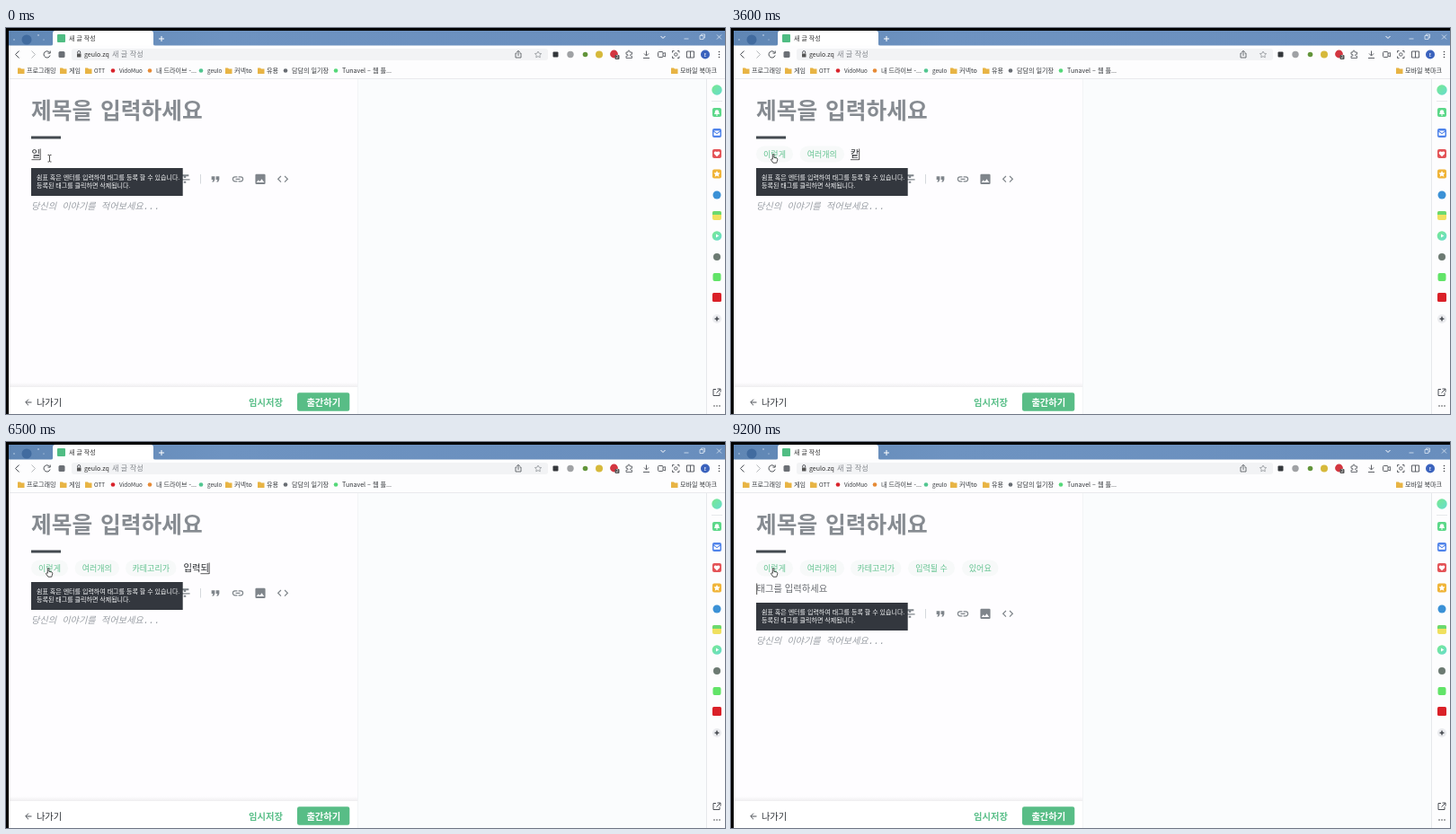
These frames come from a looping animation (800x430 px, 9300 ms). An HTML page:

```html
<!DOCTYPE html>
<html lang="ko">
<head>
<meta charset="utf-8">
<style>
html, body { margin: 0; width: 100%; height: 100%; overflow: hidden; background: #000; }
svg { display: block; width: 800px; height: 430px; }
text { font-family: "Noto Sans CJK KR", "Noto Sans CJK JP", sans-serif; white-space: pre; }
.mono { font-family: "Liberation Mono", "Noto Sans CJK KR", monospace; font-style: italic; }
.line { fill: none; stroke: #4b4f55; stroke-width: 1; }
.b { font-weight: 700; }
</style>
</head>
<body>
<svg viewBox="0 0 800 430">
  <defs>
    <linearGradient id="strip"><stop stop-color="#5f86b4"/><stop offset=".3" stop-color="#6e93c1"/><stop offset="1" stop-color="#698ebd"/></linearGradient>
    <linearGradient id="shade" x2="0" y2="1"><stop stop-color="#000" stop-opacity="0"/><stop offset="1" stop-color="#000" stop-opacity=".06"/></linearGradient>
    <linearGradient id="mint" x2="1" y2="1"><stop stop-color="#79e98f"/><stop offset="1" stop-color="#66dcd0"/></linearGradient>
  </defs>

  <!-- tab strip -->
  <rect x="3" y="3" width="797" height="17" fill="url(#strip)"/>
  <circle cx="23" cy="13" r="5.500" fill="#416b9f"/>
  <g fill="#d5e2f2"><circle cx="9" cy="13" r=".7"/><circle cx="36" cy="8" r=".8"/><circle cx="42" cy="13" r=".6"/></g>
  <path d="M50 20q2 0 2-2V6q0-3 3-3h106q3 0 3 3v12q0 2 2 2z" fill="#fff"/>
  <rect x="57" y="7" width="9" height="9" rx="1" fill="#50bd83"/>
  <text x="70" y="13.600" font-size="7" fill="#333">새 글 작성</text>
  <path d="M170 12h6M173 9v6M728.500 9l2.500 2.500 2.500-2.500" fill="none" stroke="#fff"/>
  <path d="M754.500 12h5M772 8.500h4v4h-4zM773.500 8.500v-1.500h4v4h-1.500M791 7.500l5 5M796 7.500l-5 5" fill="none" stroke="#dbe6f3" stroke-width=".8"/>

  <!-- address row and bookmarks -->
  <rect x="3" y="19.500" width="797" height="37.500" fill="#fdfdfe"/>
  <rect x="73" y="23" width="530" height="13" rx="3" fill="#f2f3f5"/>
  <g class="line">
    <path d="M14.500 25.500l-4 4 4 4"/>
    <path d="M28.500 25.500l4 4-4 4" stroke="#b5b8bc"/>
    <path d="M48.700 27.500a3.600 3.600 0 1 0 .4 3M49.200 25.500v2.600h-2.700"/>
    <path d="M79.700 28.500v-1.500a1.500 1.500 0 0 1 3 0v1.500" stroke-width=".9"/>
    <path d="M568.500 28h-1.500v5h6v-5h-1.500M570 31v-5.500M568.300 27l1.700-1.700 1.700 1.700" stroke-width=".8"/>
    <path d="M592 26l1.200 2.200 2.500.4-1.800 1.700.4 2.500-2.300-1.200-2.200 1.200.4-2.500-1.800-1.700 2.500-.4z" stroke="#92969b" stroke-width=".8"/>
    <path d="M690 27h2v-1a1 1 0 0 1 2 0v1h2.500v2.300h-1a1 1 0 0 0 0 2h1v2.200h-6.500v-2.200h1a1 1 0 0 0 0-2h-1z" stroke-width=".8"/>
    <path d="M712.500 25.500v5M710 28.500l2.500 2.500 2.500-2.500M709 33.500h7" stroke-width=".9"/>
    <rect x="725.500" y="26.500" width="5.500" height="6" rx="1" stroke-width=".9"/>
    <path d="M731 28.500l2.500-1v4.500l-2.500-1" stroke-width=".8"/>
    <path d="M741.500 27.500v-2h2M747 25.500h2v2M749 31.500v2h-2M743.500 33.500h-2v-2" stroke-width=".9"/>
    <circle cx="745.300" cy="29.500" r="1.700" stroke-width=".9"/>
    <path d="M757.500 26h8v7h-8zM761.500 26v7" stroke-width=".9"/>
  </g>
  <rect x="79" y="28.500" width="4.500" height="4" rx=".5" fill="#555"/>
  <rect x="58.500" y="26" width="7" height="7" rx="1.500" fill="#6b6f75"/>
  <text x="87" y="32.200" font-size="7" fill="#333">geulo.zq</text>
  <text x="118" y="32.400" font-size="8.200" fill="#888c91">새 글 작성</text>
  <rect x="608.500" y="26.500" width="6" height="6" rx="1" fill="#34373b"/>
  <circle cx="628" cy="29.500" r="3.700" fill="#a0a2a5"/>
  <circle cx="644.500" cy="29.500" r="2.800" fill="#63953b"/>
  <circle cx="660" cy="29.500" r="4" fill="#d6b93b"/>
  <circle cx="676.500" cy="29" r="4.400" fill="#d33640"/>
  <rect x="677.500" y="30" width="5" height="5" rx="1" fill="#555"/>
  <text x="678.700" y="34.300" font-size="4.500" fill="#fff">2</text>
  <circle cx="778" cy="29.500" r="5" fill="#3a62bd"/>
  <text x="778" y="31.500" font-size="5" fill="#fff" text-anchor="middle">E</text>
  <g fill="#44474b"><circle cx="793.500" cy="26.500" r=".8"/><circle cx="793.500" cy="29.500" r=".8"/><circle cx="793.500" cy="32.500" r=".8"/></g>
  <g id="marks"></g>
  <path d="M3 56.500h797" stroke="#e9eaed"/>

  <!-- page panes -->
  <rect x="3" y="57" width="388" height="373" fill="#fefdff"/>
  <rect x="391" y="57" width="388" height="373" fill="#fafcfd"/>
  <path d="M391.500 57v373" stroke="#f2f4f6"/>
  <text x="28" y="100.500" font-size="24.700" class="b" word-spacing="2" fill="#868b91">제목을 입력하세요</text>
  <rect x="28" y="120.500" width="33" height="3" fill="#43494f"/>

  <g id="tags"></g>
  <g id="field">
    <text id="typed" font-size="10.300"></text>
    <path id="under" stroke="#333" stroke-width=".8"/>
    <path id="caret" stroke="#222" stroke-width=".8"/>
  </g>

  <g id="below">
    <path d="M216.500 163v10.500" stroke="#d5d8dc"/>
    <g id="tools" fill="#7f858b"></g>
    <text class="mono" x="28" y="201.700" font-size="10.200" fill="#9a9fa5">당신의 이야기를 적어보세요...</text>
    <rect x="28" y="156" width="168.700" height="31" fill="#33373e"/>
    <g font-size="7" fill="#f7f8f9">
      <text x="34" y="169">쉼표 혹은 엔터를 입력하여 태그를 등록 할 수 있습니다.</text>
      <text x="34" y="178.200">등록된 태그를 클릭하면 삭제됩니다.</text>
    </g>
  </g>

  <!-- footer -->
  <rect x="3" y="395" width="388" height="5" fill="url(#shade)"/>
  <rect x="3" y="400" width="388" height="30" fill="#fff"/>
  <path class="line" d="M28.500 417h-6.500M25 413.700l-3.300 3.300 3.300 3.300" stroke="#333"/>
  <text x="34" y="420.800" font-size="10.200" fill="#2c3035">나가기</text>
  <text x="270" y="420.800" font-size="10.300" class="b" fill="#5abf89">임시저장</text>
  <rect x="324" y="406.300" width="58.300" height="20.500" rx="2.300" fill="#58bd86"/>
  <text x="334.400" y="420.700" font-size="10.300" class="b" fill="#fff">출간하기</text>

  <!-- sidebar -->
  <rect x="779" y="57" width="21" height="373" fill="#fdfdfe"/>
  <path d="M779.500 57v373M785 81.500h12" stroke="#e6e8eb"/>
  <g id="side"></g>
  <path d="M786 208v-2q0-2 2-2h6q2 0 2 2v2z" fill="#6bd96f"/>
  <g fill="#fff">
    <path d="M787.800 96q1-.7 1-2.500a2.200 2.200 0 0 1 4.400 0q0 1.800 1 2.500zM790 96.600h2v1h-2z"/>
    <path d="M787.500 114.500h7l-3.500 2.500zM787.500 115.700l3.500 2.500 3.500-2.500v4h-7z"/>
    <path d="M791 143.300l-3-3a1.700 1.700 0 0 1 3-2 1.700 1.700 0 0 1 3 2z"/>
    <path d="M791 159l1.100 2.300 2.500.3-1.800 1.700.5 2.500-2.300-1.200-2.300 1.200.5-2.500-1.800-1.700 2.500-.3z"/>
    <path d="M790 229.500l3.300 2-3.300 2z"/>
  </g>
  <path d="M791 320.800q.4 2.800 3.200 3.200-2.800.4-3.200 3.200-.4-2.800-3.200-3.200 2.800-.4 3.200-3.200z" fill="#50545a"/>
  <path class="line" d="M790 402.500h-3v7h7v-3M791.500 402h3.500v3.500M795 402l-4.500 4.500"/>
  <g fill="#44474b"><circle cx="788" cy="421" r=".8"/><circle cx="791" cy="421" r=".8"/><circle cx="794" cy="421" r=".8"/></g>

  <path id="beam" d="M46.500 141.500h1.500l.5.500.5-.5h1.500M48.500 142v6.500M46.500 149h1.500l.5-.5.5.5h1.500" fill="none" stroke="#222" stroke-width=".8"/>
  <path id="hand" d="M46.300 146.300v-5a.8.800 0 0 1 1.600 0v3l3 .7q1 .3.9 1.300l-.5 2.200-.6 1.700h-3.800l-2.500-3.600q.8-1.200 1.900-.3z" fill="#fff" stroke="#222" stroke-width=".8"/>
</svg>
<script>
const $ = id => document.getElementById(id);
const LOOP = 9300, POP = 250;

// bookmarks: x, dot colour or "" for a folder, label
const marks = [
  [13, '', '프로그래밍'], [60, '', '게임'], [88, '', 'OTT'],
  [116, '#d9232b', 'VidoMuo'], [157, '#e68a35', '내 드라이브 -...'],
  [214, '#51c690', 'geulo'], [244, '', '커넥to'], [280, '', '유용'],
  [308, '#686d73', '담담의 일기장'], [364, '#55d879', 'Tunavel – 웹 플...'],
  [740, '', '모바일 북마크']
];
$('marks').innerHTML = marks.map(([x, dot, label]) => {
  const size = /^[A-Za-z]+$/.test(label) ? 6.3 : 7.1;
  const icon = dot ? `<circle cx="${x + 3}" cy="47.500" r="2.300" fill="${dot}"/>`
                   : `<path d="M${x} 44.500h3l1 1h3.500v5.500h-7.500z" fill="#e8b444"/>`;
  return `${icon}<text x="${x + 10}" y="50" font-size="${size}" fill="#33363a">${label}</text>`;
}).join('');

// editor tools: centre x, 24-unit icon
const tools = [
  [199, 'M10 19h4v-3h-4zM5 4v3h5v3h4V7h5V4zM3 14h18v-2H3z'],
  [233, 'M6 17h3l2-4V7H5v6h3zM14 17h3l2-4V7h-6v6h3z'],
  [258, 'M3.900 12A3.100 3.100 0 0 1 7 8.900h4V7H7a5 5 0 0 0 0 10h4v-1.900H7A3.100 3.100 0 0 1 3.900 12zM8 13h8v-2H8zM17 7h-4v1.900h4a3.100 3.100 0 0 1 0 6.200h-4V17h4a5 5 0 0 0 0-10z'],
  [283, 'M21 19V5a2 2 0 0 0-2-2H5a2 2 0 0 0-2 2v14a2 2 0 0 0 2 2h14a2 2 0 0 0 2-2zM8.500 13.500l2.500 3 3.500-4.500 4.500 6H5z'],
  [308, 'M9.400 16.600L4.800 12l4.600-4.600L8 6l-6 6 6 6zM14.600 16.600l4.600-4.600-4.600-4.600L16 6l6 6-6 6z']
];
$('tools').innerHTML = tools.map(([x, d]) =>
  `<path transform="translate(${x} 168.300) scale(.62) translate(-12 -12)" d="${d}"/>`).join('');

// sidebar: y, radius, corner (equal to radius = circle), fill
const side = [
  [69, 5.7, 5.7, 'url(#mint)'], [94, 5, 2, '#5cd889'], [117, 5, 2, '#4f83ea'],
  [140, 5, 2, '#e45357'], [162.5, 5, 2, '#f0b437'], [186, 4.5, 4.5, '#3b91d6'],
  [209, 5, 2, '#f0e05f'], [231.5, 5.3, 5.3, 'url(#mint)'], [255, 4, 4, '#6c7a72'],
  [277.5, 4.5, 2, '#62e468'], [300, 5, 1.5, '#da2028'], [324, 5, 5, '#ebecef']
];
$('side').innerHTML = side.map(([y, r, c, fill]) =>
  `<rect x="${791 - r}" y="${y - r}" width="${2 * r}" height="${2 * r}" rx="${c}" fill="${fill}"/>`).join('');

// tags: label, x, width, time of entry
const tags = [
  ['이렇게', 28, 41, 800], ['여러개의', 76.5, 49.5, 3200],
  ['카테고리가', 133, 56.5, 5200], ['입력될 수', 197, 52, 7300], ['있어요', 257, 40.5, 8800]
];
const NEXT_X = [28.5, 77, 133, 197.5, 257, 28.5];
$('tags').innerHTML = tags.map(([label, , w]) =>
  `<g><rect x="${-w / 2}" y="-9" width="${w}" height="18" rx="9" fill="#f7f9f9"/>
   <text y="3.200" font-size="9" text-anchor="middle" fill="#62c28f">${label}</text></g>`).join('');
const tagNodes = [...$('tags').children];

// "time text" for every change of the field; the last letter is being composed
const keys = ('0 일/200 이러/300 이렇/500 이렇ㄱ/600 이렇게/800 /1100 ㅇ/1200 여/1400 열/1600 여러/1800 여러ㄱ/' +
  '1900 여러개/2100 여러갱/2200 여러개으/3000 여러개의/3200 /3400 ㅋ/3500 카/3600 캍/3700 카테/' +
  '3800 카텍/3900 카테고/4000 카테골/4100 카테고리/4300 카테고리ㅏ/4500 카테고리ㅏㄱ/4700 카테고리ㅏ/' +
  '4900 카테고리ㄱ/5000 카테고리가/5200 /5600 ㅇ/5700 이/5900 입/6000 입ㄹ/6100 입려/6200 입력/6400 입력ㄷ/' +
  '6500 입력되/6600 입력될/6800 입력될 /6900 입력될 ㅅ/7000 입력될 수/7300 /7700 ㅇ/7800 이/7900 있/' +
  '8100 있ㅇ/8200 있어/8400 있엉/8500 있어요/8800 ').split('/').map(k => {
    const cut = k.indexOf(' ');
    return [+k.slice(0, cut), k.slice(cut + 1)];
  });

function draw(ms) {
  const t = Math.floor(ms / 100) * 100;   // the screen refreshes ten times a second
  const [since, word] = keys.filter(k => k[0] <= t).pop();
  const count = tags.filter(g => g[3] <= t).length;
  const drop = count === tags.length ? 23 : 0;
  const x = NEXT_X[count];

  tags.forEach(([, left, w, start], i) => {
    const p = Math.max(0, Math.min(1, (t - start) / POP));
    tagNodes[i].setAttribute('transform', `translate(${left + w / 2} 140.500) scale(${.7 + .3 * p})`);
    tagNodes[i].setAttribute('opacity', t < start ? 0 : .3 + .7 * p);
  });

  const typed = $('typed');
  typed.textContent = word || '태그를 입력하세요';
  typed.setAttribute('x', x);
  typed.setAttribute('y', 144.2);
  typed.setAttribute('fill', word ? '#25282c' : '#686b70');
  const end = x + (word ? typed.getComputedTextLength() : 0);
  const composing = word && !word.endsWith(' ');
  $('under').setAttribute('d', composing ? `M${end - 9.5} 146.700H${end}` : '');
  $('caret').setAttribute('d', (t - since) % 1000 < 500 ? `M${end + .2} 134.500v12.500` : '');

  $('field').setAttribute('transform', `translate(0 ${drop})`);
  $('below').setAttribute('transform', `translate(0 ${drop})`);
  $('beam').style.display = count ? 'none' : '';
  $('hand').style.display = count ? '' : 'none';
}

const begin = performance.now();
function tick() {
  draw((performance.now() - begin) % LOOP);
  requestAnimationFrame(tick);
}
tick();
</script>
</body>
</html>
```
